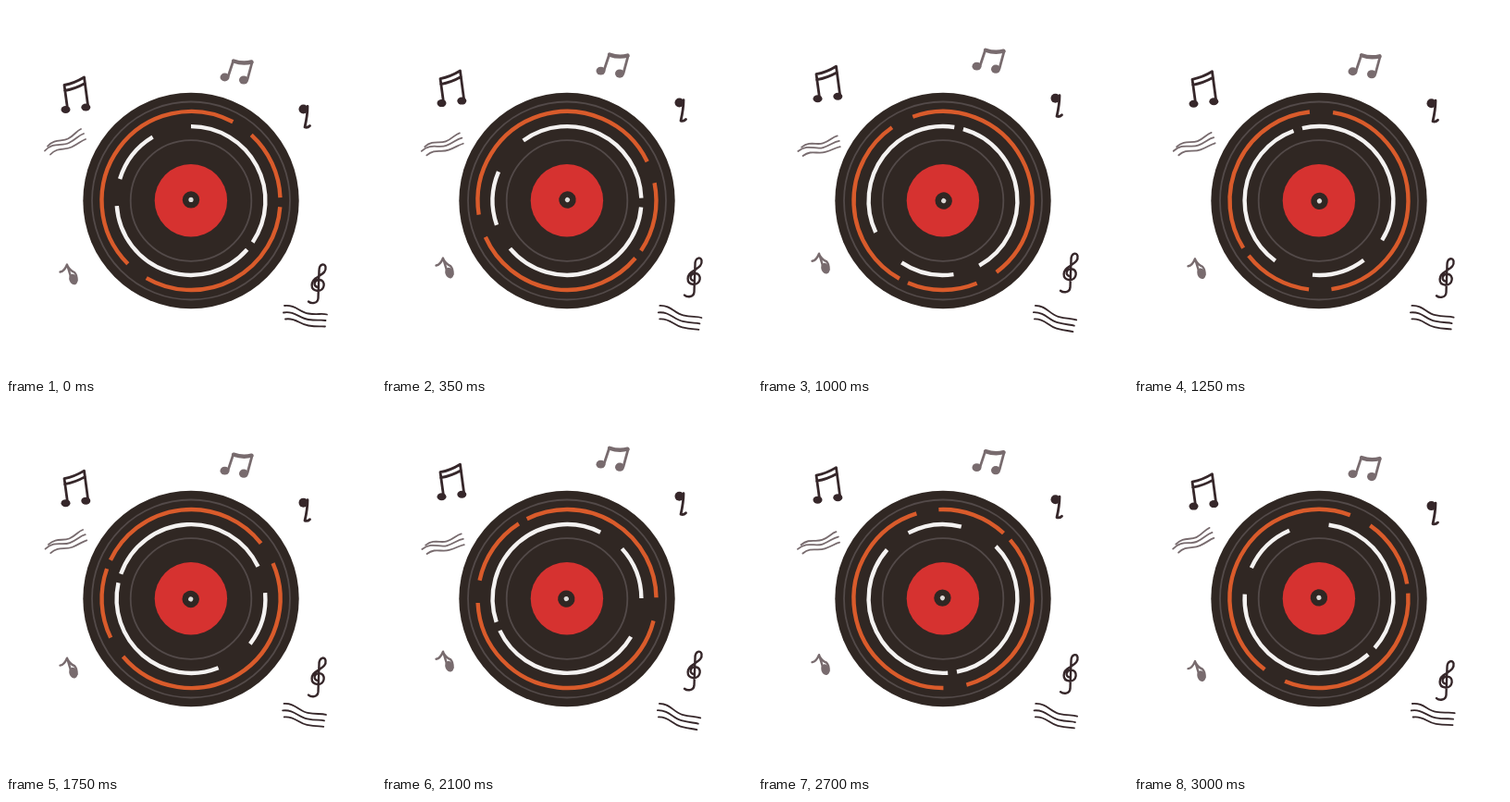
An HTML page for the animation above (3.1 s loop, 400x400 px).

```html
<!DOCTYPE html>
<html lang="en">
<head>
<meta charset="utf-8">
<title>Spinning record</title>
<style>
  html, body { margin: 0; width: 100%; height: 100%; overflow: hidden; background: #fff; }
  svg { display: block; width: 100vw; height: 100vh; }
  .line { fill: none; stroke-linecap: round; stroke-linejoin: round; }
  .dark { --ink: #36272a; }
  .grey { --ink: #786b6e; }
  .note path { stroke: var(--ink); stroke-width: 2.8; }
  .note .thin { stroke-width: 2.4; }
  .note .beam { stroke-width: 4.4; }
  .wave path { stroke: var(--ink); stroke-width: 1.8; }
  .note ellipse { fill: var(--ink); stroke: none; }
  .ring { fill: none; stroke: #534a49; stroke-width: 1.8; }
  .arcs { fill: none; stroke-width: 4.4; }
  #white { stroke: #f4f2f1; }
  #orange { stroke: #d95b2b; }
</style>
</head>
<body>
<svg viewBox="0 0 400 400">
  <circle cx="200" cy="210.5" r="116.7" fill="#302723"/>
  <circle class="ring" cx="200" cy="210.5" r="107"/>
  <circle class="ring" cx="200" cy="210.5" r="65.3"/>
  <circle cx="199.9" cy="210.2" r="39.2" fill="#d63230"/>

  <g transform="translate(200 210.5)">
    <path id="white" class="arcs"/>
    <path id="orange" class="arcs"/>
  </g>
  <g id="hub">
    <circle cx="200" cy="209.4" r="9.2" fill="#302723"/>
    <circle cx="200" cy="209.4" r="2.6" fill="#dcd8d6"/>
  </g>

  <!-- data-sway: dx, dy, turn, pivot x, pivot y -->
  <g class="line note dark" data-sway="0 -17 0 0 0">
    <path d="M66.5 111L63 85.5Q74 83.5 84.5 77L88.5 107M63.5 91.5Q75 89.5 85.5 83.5"/>
    <ellipse cx="64.5" cy="112" rx="5" ry="4"/>
    <ellipse cx="86.3" cy="109.5" rx="5" ry="4"/>
  </g>
  <g class="line note grey" data-sway="0 -17 0 0 0">
    <path d="M240 76.5L245.5 60M261 79.5L266 61"/>
    <path class="beam" d="M246 59.5Q256 63 265.5 60.5"/>
    <ellipse cx="236.5" cy="77" rx="5" ry="4.4"/>
    <ellipse cx="257" cy="80" rx="5" ry="4.6"/>
  </g>
  <g class="line note dark" data-sway="0 -17 0 0 0">
    <path d="M326 108.5Q326 118 323 131Q326 132 328.5 129.5"/>
    <ellipse cx="321.5" cy="111.5" rx="5" ry="5"/>
  </g>
  <g class="line note grey" data-sway="0 -17 0 0 0">
    <path class="thin" d="M58.5 287.5Q63 287 66 279.5L71 296M66 280Q69 286 74 288Q77 291 76.5 297"/>
    <ellipse cx="72.8" cy="295.5" rx="4.4" ry="6" transform="rotate(-20 72.8 295.5)"/>
  </g>
  <g class="line note dark" data-sway="0 -17 0 0 0">
    <path class="thin" d="M327 319.5C330 322 337 322 337.5 316L338.5 286C338.5 279 344.5 277.5 345.5 282C346.5 288 341 290 337 293C329 297 328 307 337 308C345 308 346 296.5 339 296C333 295.5 331.5 303 337 304"/>
  </g>
  <g class="line wave grey" data-sway="2 1 14 43 156">
    <path d="M45 151.5C53 143 60 147 67 143.5S76 135 81 133"/>
    <path d="M42 156.5C51 146.5 60 152 68 148S78 140 84 138"/>
    <path d="M48 160.5C56 152 63 156.5 71 152.5S81 146 86 144"/>
  </g>
  <g class="line wave dark" data-sway="-2 0 11 302 326">
    <path d="M301 324C313 322.5 317 331 327 332.5S341 332 347 333.5"/>
    <path d="M300 331.5C312 329.5 317 337.5 327 339S341 339 345.5 340"/>
    <path d="M302 338.5C313 336.5 317 344 327 345.5S341 346 345 346.5"/>
  </g>
</svg>
<script>
  const LOOP = 3100, STEP = 62.5, FRAMES = 49;
  const byId = id => document.getElementById(id);
  const move = (el, value) => el.setAttribute('transform', value);

  // Each arc is [start, sweep] in degrees, clockwise from the right.
  function drawArcs(id, r, arcs) {
    const point = deg => {
      const a = deg * Math.PI / 180;
      return `${r * Math.cos(a)} ${r * Math.sin(a)}`;
    };
    byId(id).setAttribute('d', arcs.map(([start, sweep]) =>
      `M${point(start)}A${r} ${r} 0 0 1 ${point(start + sweep)}`).join(''));
  }
  drawArcs('white', 80.4, [[-90, 124], [41, 135], [197, 42]]);
  drawArcs('orange', 96.5, [[135, 163], [-47.5, 45.5], [4, 116]]);

  const swayers = [...document.querySelectorAll('[data-sway]')].map(el =>
    ({ el, sway: el.dataset.sway.split(' ').map(Number) }));

  // The record speeds up slightly in its last 21 steps.
  const spin = k => k < 28 ? 7.2 * k : 201.6 + (k - 28) * 158.4 / 21;

  function draw(time) {
    const k = Math.min(FRAMES - 1, Math.floor((time % LOOP) / STEP));
    const angle = spin(k);
    move(byId('white'), `rotate(${-angle})`);
    move(byId('orange'), `rotate(${angle})`);
    move(byId('hub'), `rotate(${angle} 200 210.2)`);

    // Triangle wave, twice per loop
    const phase = k * 2 / FRAMES % 1;
    const p = 1 - Math.abs(1 - 2 * phase);
    for (const { el, sway: [dx, dy, deg, x, y] } of swayers)
      move(el, `translate(${dx * p} ${dy * p}) rotate(${deg * p} ${x} ${y})`);
  }

  const start = performance.now();
  function tick() {
    draw(performance.now() - start);
    requestAnimationFrame(tick);
  }
  tick();
</script>
</body>
</html>
```
